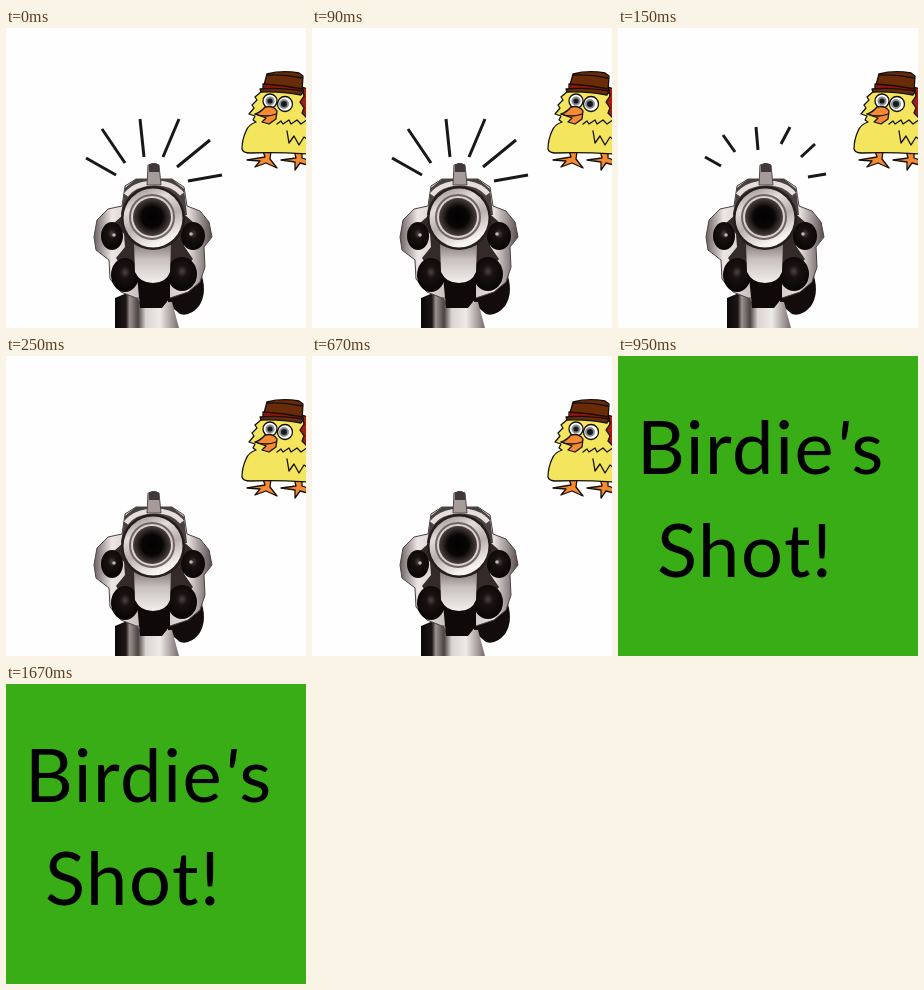
These frames come from a looping animation (300x300 px, 2150 ms). An HTML page:

```html
<!DOCTYPE html>
<html lang="en">
<head>
<meta charset="utf-8">
<title>Birdie's Shot</title>
<style>
  html, body { margin: 0; width: 100%; height: 100%; overflow: hidden; background: #fefefe; }
  svg { display: block; width: 100%; height: 100%; }
  text { font: 74px Lato, "Open Sans", sans-serif; letter-spacing: 1.6px; }
  tspan { font-style: italic; }
  #rays { stroke: #181818; stroke-width: 3; fill: none; }
  #bird { stroke: #15110a; stroke-width: 1.3; stroke-linejoin: round; stroke-linecap: round; }
</style>
</head>
<body>
<svg viewBox="0 0 300 300">
  <defs>
    <linearGradient id="steel">
      <stop offset="0" stop-color="#6b6060"/>
      <stop offset=".15" stop-color="#ece7e5"/>
      <stop offset=".45" stop-color="#beb5b3"/>
      <stop offset=".8" stop-color="#e6e0de"/>
      <stop offset="1" stop-color="#574c4c"/>
    </linearGradient>
    <linearGradient id="grip">
      <stop offset="0" stop-color="#0c0808"/>
      <stop offset=".17" stop-color="#1d1616"/>
      <stop offset=".23" stop-color="#9b9290"/>
      <stop offset=".36" stop-color="#4b4242"/>
      <stop offset=".48" stop-color="#d9d3d1"/>
      <stop offset=".7" stop-color="#efebe9"/>
      <stop offset="1" stop-color="#766c6b"/>
    </linearGradient>
    <linearGradient id="underside" x2="0" y2="1">
      <stop offset="0" stop-color="#817776"/>
      <stop offset=".4" stop-color="#c6bfbd"/>
      <stop offset="1" stop-color="#f3efed"/>
    </linearGradient>
    <linearGradient id="rim" x2=".4" y2="1">
      <stop offset="0" stop-color="#8b817f"/>
      <stop offset=".35" stop-color="#e2dcda"/>
      <stop offset=".65" stop-color="#b9b0ae"/>
      <stop offset="1" stop-color="#f7f4f2"/>
    </linearGradient>
    <radialGradient id="bore">
      <stop offset="0" stop-color="#020101"/>
      <stop offset=".55" stop-color="#090606"/>
      <stop offset="1" stop-color="#4c4040"/>
    </radialGradient>
    <radialGradient id="chamber" cx=".5" cy=".42">
      <stop offset="0" stop-color="#4d4242"/>
      <stop offset=".35" stop-color="#191112"/>
      <stop offset="1" stop-color="#0b0707"/>
    </radialGradient>
  </defs>

  <g id="scene">
    <g id="gun">
      <path fill="#120c0d" d="M162 258L196 248Q201 266 193 278 184 289 174 286L162 276Z"/>
      <path fill="url(#grip)" d="M109 270L128 262 134 274H166L173 300H109Z"/>
      <path fill="url(#steel)" stroke="#4c4141" d="M119 158L130 151H166L178 159 181 178 194 183 203 194 206 209 198 219 199 239 194 254 182 264 164 270H130L115 264 104 251 103 232 90 222 88 209 91 192 102 181 116 178Z"/>
      <path fill="#352a2a" d="M117 187L108 195 118 206 119 219 110 230 125 252 132 230H162L169 252 187 231 178 218 178 204 188 195 179 187Z"/>
      <g fill="url(#chamber)">
        <ellipse cx="106" cy="208" rx="11" ry="14"/>
        <ellipse cx="187" cy="208" rx="12" ry="14"/>
        <ellipse cx="119" cy="247" rx="14" ry="17"/>
        <ellipse cx="176" cy="246" rx="15" ry="17"/>
      </g>
      <g fill="#bcb4b2">
        <circle cx="108" cy="207" r="1.8"/>
        <circle cx="185" cy="206" r="1.8"/>
      </g>
      <path fill="#0f090a" d="M131 248H164V270L156 280H134Z"/>
      <path fill="url(#underside)" d="M128 215H165L164 244Q160 255 147 255T129 244Z"/>
      <path fill="#494040" d="M119 160L130 151H166L178 161 181 187H115Z"/>
      <path fill="none" stroke="#e4dfdd" stroke-width="5" d="M120 167Q128 156 147 155T176 166"/>
      <path fill="#a59b99" stroke="#51484a" d="M141 157L142 137Q147 134 153 137L155 157Z"/>
      <path fill="#40383a" d="M143 137Q148 133 153 137V144H143Z"/>
      <circle cx="147" cy="190" r="32" fill="#251c1d"/>
      <circle cx="147" cy="190" r="29.5" fill="url(#rim)"/>
      <circle cx="146" cy="189" r="22" fill="#d9d2d0" stroke="#706564" stroke-width="2"/>
      <circle cx="146" cy="189" r="19" fill="url(#bore)"/>
    </g>

    <g id="bird">
      <g fill="#f58a32">
        <path d="M257 123L259 129 241 132 254 133 249 139 260 135 271 140 264 131 265 123Z"/>
        <path d="M288 122L290 130 275 132 289 134 289 142 294 135 302 137V132L296 130 296 122Z"/>
      </g>
      <path fill="#f3e55e" d="M256 63L249 69 251 72 246 77 248 80 243 86 249 88 247 92 250 94Q242 97 240 103 236 112 236 121 237 125 244 125 270 124 302 126V66L296 62Z"/>
      <path fill="none" d="M271 96L275 93 277 96 283 92 285 96 291 92 295 96 302 91M281 103L283 115 288 108 293 117 298 109 302 112"/>
      <path fill="#a51c12" d="M296 59L302 61V91L296 85 298 80 294 74 298 68Z"/>
      <g fill="#fff">
        <circle cx="264" cy="73" r="7"/>
        <circle cx="279" cy="76" r="7.5"/>
      </g>
      <g fill="#17191b" stroke="#8a8e90" stroke-width="2">
        <circle cx="264" cy="73" r="3.6"/>
        <circle cx="278" cy="76" r="4"/>
      </g>
      <path fill="#f58a32" d="M249 86Q255 84 259 79 267 77 271 83L270 91 263 96 256 94 260 90Z"/>
      <path fill="none" d="M249 86Q260 90 270 86"/>
      <path fill="#692b08" d="M258 57L261 46Q276 42 293 45L297 48 296 64 258 60Z"/>
      <path fill="none" d="M261 47Q278 46 296 50"/>
      <path fill="#8c160d" d="M257 56Q277 57 297 61V65L257 61Z"/>
      <path fill="#692b08" d="M254 61Q273 59 297 63L295 67Q273 63 255 64Z"/>
    </g>
    <path id="rays"/>
  </g>

  <g id="title">
    <rect width="300" height="300" fill="#39ad16"/>
    <text x="19" y="118">Birdie<tspan>'</tspan>s</text>
    <text x="39" y="221">Shot!</text>
  </g>
</svg>
<script>
  const LOOP = 2150, SHRINK = 150, CLEAR = 250, TITLE = 950;
  const longRays = "M80 130L110 147M96 101L119 135M134 91L138 129M173 91L157 129M204 112L171 139M216 147L182 153";
  const shortRays = "M87 129L103 138M105 107L117 124M138 99L140 122M172 99L163 116M197 116L183 129M208 146L190 149";
  const [scene, rays, title] = ["scene", "rays", "title"].map(id => document.getElementById(id));
  const show = (element, visible) => element.style.display = visible ? "" : "none";

  function draw(now) {
    const t = now % LOOP;
    show(scene, t < TITLE);
    show(title, t >= TITLE);
    rays.setAttribute("d", t < SHRINK ? longRays : t < CLEAR ? shortRays : "");
  }

  let start;
  function tick(now) {
    start ??= now;
    draw(now - start);
    requestAnimationFrame(tick);
  }
  draw(0);
  requestAnimationFrame(tick);
</script>
</body>
</html>
```
